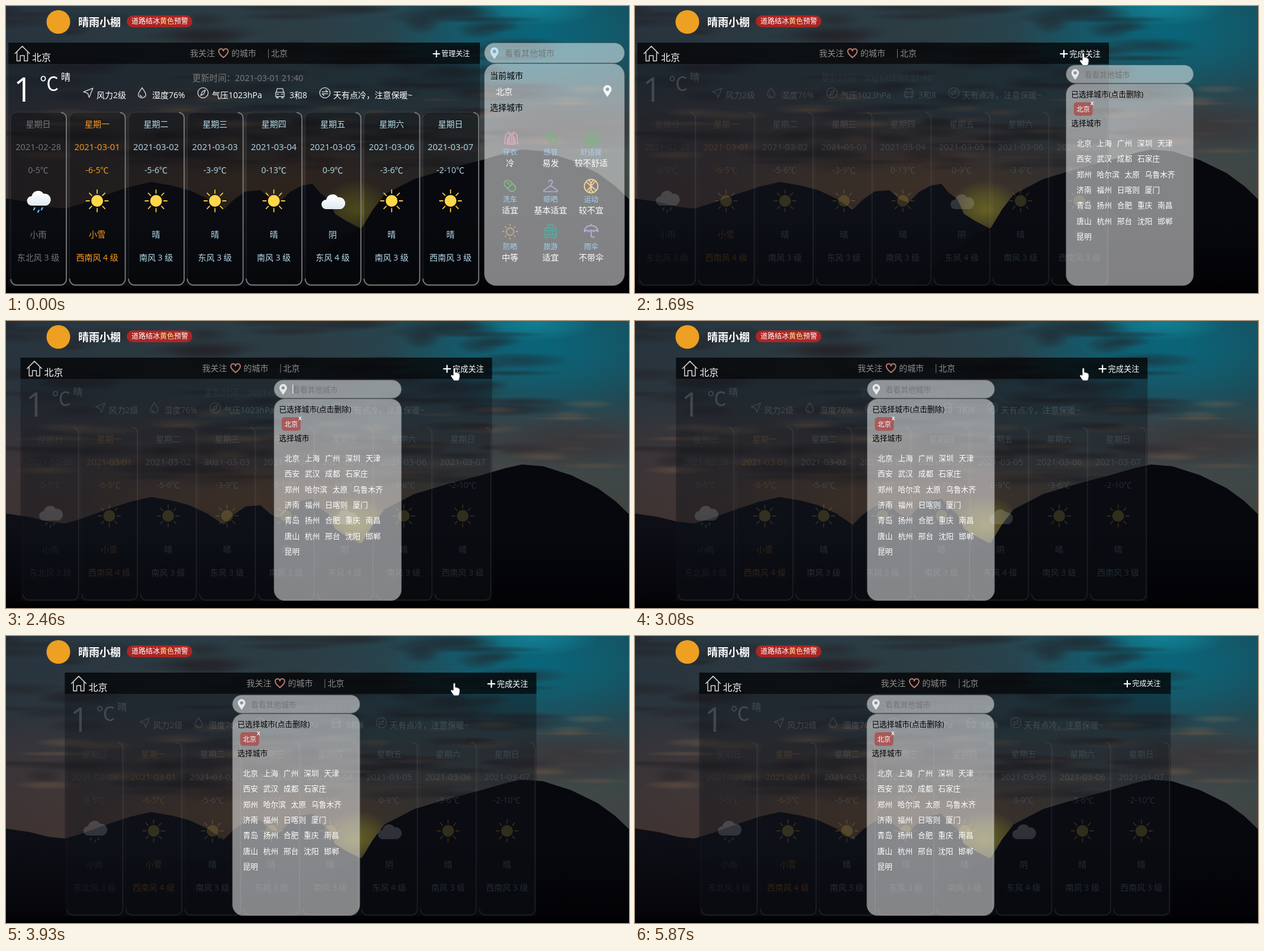
Recreate the animation shown at these times as an HTML page with a canvas. Size 1053x486 px, loop 6020 ms.

```html
<!DOCTYPE html>
<html lang="zh-CN">
<head>
<meta charset="utf-8">
<title>天气</title>
<style>
html, body { margin: 0; width: 100%; height: 100%; overflow: hidden; background: #000; }
canvas { display: block; width: 1053px; height: 486px; }
</style>
</head>
<body>
<canvas id="stage" width="1053" height="486"></canvas>
<script>
const W = 1053, H = 486, LOOP = 6020;
const FONT = '"Open Sans", "Noto Sans CJK SC", "Noto Sans CJK", sans-serif';
const ctx = document.getElementById('stage').getContext('2d');
const TAU = Math.PI * 2;

const clamp = v => Math.max(0, Math.min(1, v));
const mix = (a, b, k) => a + (b - a) * k;

// CSS "ease": cubic-bezier(.25, .1, .25, 1)
function ease(p) {
  p = clamp(p);
  if (p === 0 || p === 1) return p;
  const bez = (s, a, b) => 3 * s * (1 - s) ** 2 * a + 3 * s * s * (1 - s) * b + s ** 3;
  let lo = 0, hi = 1;
  for (let i = 0; i < 20; i++) {
    const mid = (lo + hi) / 2;
    if (bez(mid, .25, .25) < p) lo = mid; else hi = mid;
  }
  return bez(lo, .1, 1);
}

function makeBackdrop() {
  const layer = document.createElement('canvas');
  layer.width = W;
  layer.height = H;
  const g = layer.getContext('2d');
  let seed = 11;
  const rnd = () => (seed = (seed * 16807) % 2147483647) / 2147483647;

  const fade = (x0, y0, x1, y1, stops) => {
    const grad = g.createLinearGradient(x0, y0, x1, y1);
    stops.forEach(([at, color]) => grad.addColorStop(at, color));
    g.fillStyle = grad;
    g.fillRect(0, 0, W, H);
  };
  const puff = (x, y, rx, ry, rgb, alpha) => {
    g.save();
    g.translate(x, y);
    g.scale(rx, ry);
    const grad = g.createRadialGradient(0, 0, 0, 0, 0, 1);
    grad.addColorStop(0, `rgba(${rgb},${alpha})`);
    grad.addColorStop(.5, `rgba(${rgb},${alpha * .6})`);
    grad.addColorStop(1, `rgba(${rgb},0)`);
    g.fillStyle = grad;
    g.fillRect(-1, -1, 2, 2);
    g.restore();
  };
  const ridge = (points, color) => {
    g.fillStyle = color;
    g.beginPath();
    g.moveTo(points[0][0], H);
    points.forEach(([x, y]) => g.lineTo(x, y));
    g.lineTo(points[points.length - 1][0], H);
    g.fill();
  };

  fade(0, 0, 0, H, [[0, '#2a454f'], [.25, '#30434b'], [.42, '#4a4443'], [.55, '#55453f'], [.75, '#5a4030']]);
  fade(0, 0, W, 0, [[0, 'rgba(36,36,46,.5)'], [.5, 'rgba(46,42,44,.25)'], [.7, 'rgba(0,80,100,.15)'], [1, 'rgba(0,75,92,.28)']]);
  puff(900, 45, 260, 120, '0,112,136', .75);
  puff(890, 4, 110, 30, '20,140,160', .7);
  puff(500, 160, 230, 50, '35,70,82', .5);
  for (let i = 0; i < 110; i++)
    puff(rnd() * 880, rnd() * 275, 30 + rnd() * 75, 5 + rnd() * 12, '34,31,36', .5);
  for (let i = 0; i < 35; i++)
    puff(rnd() * W, 140 + rnd() * 120, 25 + rnd() * 55, 3 + rnd() * 7, '145,108,76', .3);
  puff(960, 205, 180, 50, '58,52,55', .85);
  puff(470, 300, 330, 60, '140,95,50', .35);
  puff(592, 345, 62, 50, '180,168,45', .9);

  ridge([[0, 326], [40, 332], [72, 340], [100, 343], [130, 334], [165, 321], [210, 306], [245, 298],
    [280, 304], [310, 312], [340, 326], [368, 345], [385, 328], [405, 314], [430, 312], [448, 328],
    [462, 333], [480, 315], [500, 304], [518, 301], [530, 316], [545, 327], [556, 352], [575, 364],
    [600, 377], [640, 440]], '#0e0f16');
  ridge([[470, 474], [530, 420], [570, 390], [602, 375], [620, 345], [640, 319], [690, 293], [750, 275],
    [800, 262], [845, 249], [872, 243], [908, 246], [955, 261], [1000, 283], [1030, 305], [W, 327]], '#07080d');
  fade(0, 0, 0, H, [[.72, 'rgba(0,0,5,0)'], [.97, 'rgba(0,0,3,.7)'], [1, '#000']]);
  return layer;
}
const backdrop = makeBackdrop();

function text(str, x, y, size, color, align = 'left', weight = 400) {
  ctx.font = `${weight} ${size}px ${FONT}`;
  ctx.textAlign = align;
  ctx.textBaseline = 'alphabetic';
  ctx.fillStyle = color;
  ctx.fillText(str, x, y + size * .37);
}

function box(x, y, w, h, r, fill, stroke) {
  ctx.beginPath();
  ctx.roundRect(x, y, w, h, r);
  if (fill) { ctx.fillStyle = fill; ctx.fill(); }
  if (stroke) { ctx.strokeStyle = stroke; ctx.lineWidth = 1; ctx.stroke(); }
}

function dot(x, y, r, color) {
  ctx.fillStyle = color;
  ctx.beginPath();
  ctx.arc(x, y, r, 0, TAU);
  ctx.fill();
}

// Line icons live in a 24-unit box centred on (x, y).
const SHAPES = {
  home: 'M1 12 12 1 23 12M4 10V23H9V15H15V23H20V10',
  heart: 'M12 21C5 16 2 12 2 8A5 5 0 0 1 12 7 5 5 0 0 1 22 8C22 12 19 16 12 21Z',
  plane: 'M2 10 22 2 14 22 11 13Z',
  drop: 'M12 1C7 9 4 12 4 16A8 7 0 0 0 20 16C20 12 17 9 12 1ZM8 17A4 4 0 0 0 12 20',
  compass: 'M1 12A11 11 0 1 0 23 12A11 11 0 1 0 1 12M17 6 14 14 7 18 10 10Z',
  car: 'M4 11 6 3H18L20 11M3 11H21V20H3ZM5 20V23H8V20M16 20V23H19V20M6 15H9M15 15H18',
  swap: 'M1 12A11 11 0 1 0 23 12A11 11 0 1 0 1 12M6 10H18L14 6M18 14H6L10 18',
  coat: 'M8 2 3 6 1 21H5L7 10V22H17V10L19 21H23L21 6 16 2 12 6ZM12 6V22M9 3V21M15 3V21',
  pill: 'M4 4A6 6 0 0 1 12 4L20 12A6 6 0 0 1 12 20L4 12A6 6 0 0 1 4 4M8 16 16 8M7 6 10 9',
  face: 'M1 12A11 11 0 1 0 23 12A11 11 0 1 0 1 12M6 13A6 6 0 0 0 18 13ZM7 8H9M15 8H17',
  hanger: 'M9 5A3 3 0 1 1 13 8L12 11 1 19V21H23V19L12 11',
  ball: 'M1 12A11 11 0 1 0 23 12A11 11 0 1 0 1 12M4 5 20 19M19 4 5 20M8 2C14 8 14 17 8 22M16 2C9 8 9 17 16 22',
  shade: 'M6 12A6 6 0 1 0 18 12A6 6 0 1 0 6 12M12 0V2M12 22V24M0 12H2M22 12H24M4 4 5 5M19 19 20 20M20 4 19 5M4 20 5 19',
  bag: 'M3 6H21V21H3ZM8 6V1H16V6M3 10H21M3 17H21M9 10V17M15 10V17M6 21V24M18 21V24',
  umbrella: 'M1 12A11 10 0 0 1 23 12C20 9 17 10 16 12 14 9 10 9 8 12 6 9 3 10 1 12ZM12 0V2M12 10V20A3 3 0 0 0 17 20'
};
for (const name in SHAPES) SHAPES[name] = new Path2D(SHAPES[name]);

function icon(name, x, y, size, color, width = 1.4) {
  ctx.save();
  ctx.translate(x - size / 2, y - size / 2);
  ctx.scale(size / 24, size / 24);
  ctx.strokeStyle = color;
  ctx.lineWidth = width * 24 / size;
  ctx.lineJoin = ctx.lineCap = 'round';
  ctx.stroke(SHAPES[name]);
  ctx.restore();
}

const pinPath = new Path2D('M0 11C-3 6 -7 2 -7 -2A7 7 0 0 1 7 -2C7 2 3 6 0 11ZM3 -2A3 3 0 1 0 -3 -2A3 3 0 1 0 3 -2Z');
function pin(x, y, color) {
  ctx.save();
  ctx.translate(x, y);
  ctx.fillStyle = color;
  ctx.fill(pinPath, 'evenodd');
  ctx.restore();
}

function sun(x, y) {
  dot(x, y, 10, '#ffd84a');
  ctx.strokeStyle = '#f5c542';
  ctx.lineWidth = 1.8;
  ctx.beginPath();
  for (let i = 0; i < 8; i++) {
    const c = Math.cos(i * TAU / 8), s = Math.sin(i * TAU / 8);
    ctx.moveTo(x + c * 13, y + s * 13);
    ctx.lineTo(x + c * 18.5, y + s * 18.5);
  }
  ctx.stroke();
}

const cloudPath = new Path2D('M-11 12A8 8 0 0 1 -11 -4A11 11 0 0 1 9 -8A9 9 0 0 1 13 12Z');
function cloud(x, y, rain) {
  ctx.save();
  ctx.translate(x, y);
  const grad = ctx.createLinearGradient(0, -12, 0, 12);
  grad.addColorStop(0, '#fff');
  grad.addColorStop(1, '#dfe9f2');
  ctx.fillStyle = grad;
  ctx.fill(cloudPath);
  ctx.restore();
  if (!rain) return;
  ctx.strokeStyle = '#69b2e6';
  ctx.lineWidth = 2.5;
  ctx.lineCap = 'round';
  ctx.beginPath();
  [[-6, 16], [1, 20], [7, 16]].forEach(([dx, dy]) => {
    ctx.moveTo(x + dx, y + dy);
    ctx.lineTo(x + dx - 1.5, y + dy + 3);
  });
  ctx.stroke();
}

const DAYS = [
  ['日', '02-28', '0-5℃', '小雨', '东北风 3 级', '#777'],
  ['一', '03-01', '-6-5℃', '小雪', '西南风 4 级', '#ff9d1c'],
  ['二', '03-02', '-5-6℃', '晴', '南风 3 级'],
  ['三', '03-03', '-3-9℃', '晴', '东风 3 级'],
  ['四', '03-04', '0-13℃', '晴', '南风 3 级'],
  ['五', '03-05', '0-9℃', '阴', '东风 4 级'],
  ['六', '03-06', '-3-6℃', '晴', '南风 3 级'],
  ['日', '03-07', '-2-10℃', '晴', '西南风 3 级']
];

function drawDay(day, i) {
  const [name, date, range, sky, wind, color = '#b5dcec'] = day;
  const x = 4 + i * 99.55, mid = x + 46.5;
  box(x, 180, 94, 293, 10, 'rgba(0,0,0,.28)', 'rgba(120,120,120,.25)');
  ctx.strokeStyle = '#7a7a7a';
  ctx.lineWidth = 1.8;
  ctx.beginPath();
  ctx.moveTo(x + 86, 180.5);
  ctx.arcTo(x + 94, 180.5, x + 94, 190, 9);
  ctx.arcTo(x + 94, 472.5, x + 84, 472.5, 10);
  ctx.arcTo(x, 472.5, x, 462, 10);
  ctx.stroke();
  text('星期' + name, mid, 200, 14, color, 'center');
  text('2021-' + date, mid, 239, 14.8, color, 'center');
  text(range, mid, 278, 14, color, 'center');
  text(sky, mid, 387, 14, color, 'center');
  text(wind, mid, 426, 14, color, 'center');
  if (sky === '小雨') cloud(mid, 326, true);
  else if (sky === '阴') cloud(mid, 332, false);
  else sun(mid, 330);
}

const INFO = [
  ['plane', 135, 149, '风力2级'], ['drop', 226, 243, '湿度76%'], ['compass', 329, 344, '气压1023hPa'],
  ['car', 459, 475, '3和8'], ['swap', 535, 549, '天有点冷，注意保暖~']
];

function drawMain(x, editing, bodyAlpha, hover) {
  ctx.save();
  ctx.translate(x, 0);
  ctx.fillStyle = 'rgba(16,19,28,.42)';
  ctx.fillRect(0, 62, 797, 412);
  ctx.fillStyle = 'rgba(0,0,0,.62)';
  ctx.fillRect(0, 62, 797, 36);

  icon('home', 23.5, 80.5, 27, '#d5d5d5', 1.5);
  text('北京', 40, 87, 16, '#fff');
  text('我关注', 307, 80, 14, '#8c8c8c');
  icon('heart', 363.5, 80, 19, '#bd7a70', 2);
  text('的城市', 377, 80, 14, '#8c8c8c');
  ctx.fillStyle = '#777';
  ctx.fillRect(439, 73, 1, 15);
  text('北京', 444, 80, 14, '#8c8c8c');

  ctx.save();
  ctx.translate(749.5, 81);
  if (hover) ctx.scale(1.1, 1.1);
  ctx.fillStyle = '#fff';
  ctx.fillRect(-32, -1, 12, 2);
  ctx.fillRect(-27, -6, 2, 12);
  text(editing ? '完成关注' : '管理关注', -17.5, 0, 12, '#fff', 'left', 500);
  ctx.restore();

  ctx.globalAlpha = bodyAlpha;
  text('1', 9, 141, 56, '#fff');
  text('℃', 53, 131, 32, '#fff');
  text('晴', 89, 120, 16, '#fff');
  text('更新时间：2021-03-01 21:40', 311, 122, 14.4, '#7d7d7d');
  for (const [name, ix, tx, label] of INFO) {
    icon(name, ix, 147, 19, '#ddd', 1.3);
    text(label, tx, 151, 14, '#fff');
  }
  DAYS.forEach(drawDay);
  ctx.restore();
}

const LIFE = [
  ['coat', '#d8a9bb', '穿衣', '冷'], ['pill', '#78b878', '感冒', '易发'], ['face', '#74bd7a', '舒适度', '较不舒适'],
  ['pill', '#7fbf83', '洗车', '适宜'], ['hanger', '#a9acd0', '晾晒', '基本适宜'], ['ball', '#f0cf94', '运动', '较不宜'],
  ['shade', '#c5a78c', '防晒', '中等'], ['bag', '#57a99d', '旅游', '适宜'], ['umbrella', '#b5b2dc', '雨伞', '不带伞']
];

const CITIES = [
  '北京 上海 广州 深圳 天津', '西安 武汉 成都 石家庄', '郑州 哈尔滨 太原 乌鲁木齐', '济南 福州 日喀则 厦门',
  '青岛 扬州 合肥 重庆 南昌', '唐山 杭州 邢台 沈阳 邯郸', '昆明'
];

function drawOverview() {
  text('当前城市', 10, 118, 14, '#000');
  text('北京', 20, 145, 14, '#fff', 'left', 500);
  pin(208.5, 143, '#f4f8fa');
  text('选择城市', 10, 172, 14, '#000');
  LIFE.forEach(([name, color, label, value], i) => {
    const x = 44 + (i % 3) * 68.5, row = Math.floor(i / 3);
    icon(name, x + (row ? 0 : 2), [224, 305, 382][row], 25, color, 1.9);
    text(label, x, 248 + row * 80, 12, '#a6d2f0', 'center');
    text(value, x, 266 + row * 80, 14, '#fff', 'center', 500);
  });
}

function drawPicker() {
  text('已选择城市(点击删除)', 10, 116.5, 14, '#000');
  box(15, 132, 35, 25, 5, '#a85a5a');
  text('北京', 32.5, 145, 12.5, '#fff', 'center', 500);
  text('x', 49, 133, 12, '#fff', 'center', 600);
  text('选择城市', 10, 171, 14, '#000');
  CITIES.forEach((line, row) => {
    let x = 20;
    for (const city of line.split(' ')) {
      text(city, x, 208 + row * 29, 14, '#fff', 'left', 500);
      x += city.length * 14 + 9.7;
    }
  });
}

function drawPanel(left, scale, editing, caret) {
  ctx.save();
  ctx.translate(left, 474);
  ctx.scale(scale, scale);
  ctx.translate(0, -474);
  const fill = 'rgba(255,255,255,.5)', edge = 'rgba(90,90,90,.6)';
  box(.5, 62.5, 237, 34, 17, fill, edge);
  box(.5, 97.5, 237, 376, 20, fill, edge);
  pin(17.5, 79, editing ? '#e6eaec' : '#c4e2f2');
  text('看看其他城市', 35, 80, 14, '#757575');
  if (caret) {
    ctx.fillStyle = '#fff';
    ctx.fillRect(35, 71, 1.2, 17);
  }
  if (editing) drawPicker(); else drawOverview();
  ctx.restore();
}

const hand = new Path2D('M5 13V2.5Q5 .5 6.8 .5T8.5 2.5V8Q10.5 7 11.5 8.8 13.5 8 14.2 9.8 16 9.5 16 12V16Q15.5 19 14 22H6Q4 19 .8 14.5 .5 12 2.5 12Z');
const arrow = new Path2D('M0 0V17L4 13 7 20 10 19 7 12H13Z');
const POINTER = [
  [70, 868, 430], [460, 751, 63], [610, 751, 65], [760, 751, 79], [4950, 751, 79],
  [5010, 980, 420], [5320, 1036, 484], [5790, 1038, 487], [5870, 1034, 485], [LOOP, 1034, 485]
];

function drawPointer(t) {
  if (t < 70) return;
  const next = Math.max(1, POINTER.findIndex(key => key[0] > t));
  const [t0, x0, y0] = POINTER[next - 1], [t1, x1, y1] = POINTER[next];
  const k = clamp((t - t0) / (t1 - t0));
  const shape = t > 430 && t < 4960 ? hand : arrow;
  ctx.save();
  ctx.translate(mix(x0, x1, k), mix(y0, y1, k));
  ctx.fillStyle = '#fff';
  ctx.strokeStyle = '#222';
  ctx.lineWidth = .8;
  ctx.fill(shape);
  ctx.stroke(shape);
  ctx.restore();
}

function draw(t) {
  const editing = t >= 930;
  const change = ease((t - 900) / 320);
  const slide = ease((t - 1313) / 2650);
  const mainX = 4 + 104.5 * ease((t - 1995) / 3000);
  const scale = mix(1, .909, change);
  // Shrinking keeps the panel centred until it slides away.
  const offset = mix(804 + 119 * (1 - scale), 282.8, slide);
  const caret = t >= 1080 && (t - 1080) % 1060 < 530;

  ctx.drawImage(backdrop, 0, 0);
  dot(88.5, 27, 20, '#eda021');
  text('晴雨小棚', 122, 27, 18, '#fff', 'left', 700);
  box(204, 16, 111, 20, 10, '#ab2624');
  text('道路结冰', 212, 26, 12, '#fff');
  text('黄色', 260, 26, 12, '#ffec9a');
  text('预警', 284, 26, 12, '#fff');

  drawMain(mainX, editing, mix(1, .16, change), t > 400 && t < 5010);
  drawPanel(mainX + offset, scale, editing, caret);
  drawPointer(t);
}

const start = performance.now();
function tick() {
  draw((performance.now() - start) % LOOP);
  requestAnimationFrame(tick);
}
tick();
</script>
</body>
</html>
```
